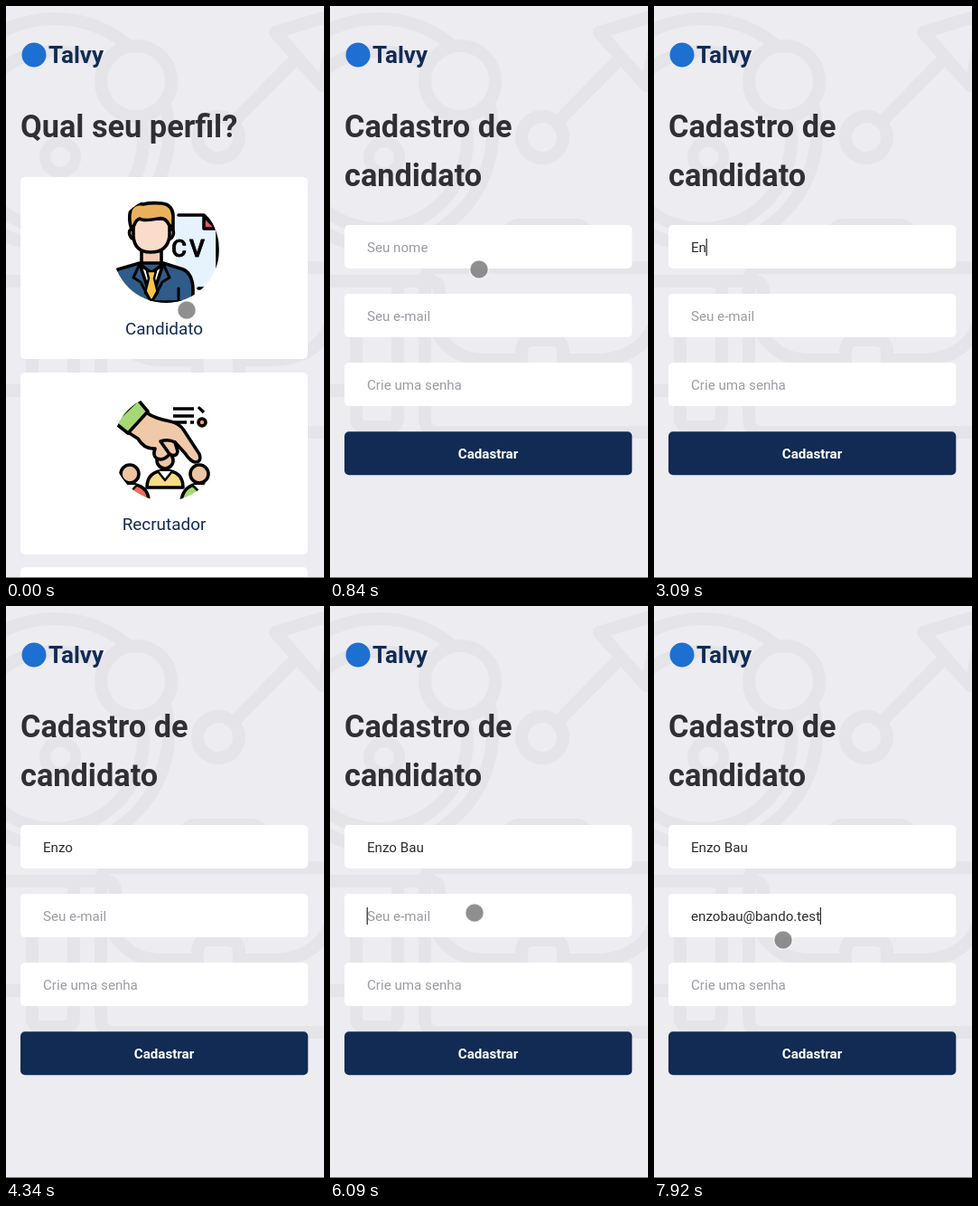
Write an HTML page that moves like this. It is 352 by 632 pixels and loops after 8000 ms.

```html
<!DOCTYPE html>
<html lang="pt">
<head>
<meta charset="utf-8">
<style>
html, body { margin: 0; width: 100%; height: 100%; overflow: hidden; background: #edecf1; }
svg { display: block; font-family: Roboto, sans-serif; }
.title { font-size: 34.3px; font-weight: 700; fill: #303033; }
.label { font-size: 18.9px; fill: #122b54; text-anchor: middle; }
.field { font-size: 15.15px; }
.art { stroke: #000; stroke-width: 3.6; stroke-linejoin: round; stroke-linecap: round; }
</style>
</head>
<body>
<svg width="352" height="632" viewBox="0 0 352 632">
  <defs>
    <clipPath id="clipA"><circle cx="177" cy="269" r="59"/></clipPath>
    <clipPath id="clipB"><circle cx="177" cy="488" r="59"/></clipPath>
  </defs>

  <rect width="352" height="632" fill="#edecf1"/>
  <g fill="none" stroke="#e4e4e9" stroke-width="14" stroke-linejoin="round">
    <circle cx="54" cy="140" r="126"/>
    <circle cx="54" cy="148" r="98"/>
    <circle cx="60" cy="167" r="17" stroke-width="12"/>
    <circle cx="144" cy="83" r="39" fill="#edecf1"/>
    <circle cx="235" cy="145" r="23" fill="#edecf1"/>
    <path d="M252 128L322 57M298 29L368 8L350 88Z"/>
    <path d="M188 289L198 250Q201 242 210 242H272Q281 242 284 250L294 289"/>
    <path d="M360 289H120Q105 289 105 304V456Q105 471 120 471H360"/>
    <path d="M105 325Q120 391 172 391H205M265 391H300Q345 388 360 350"/>
    <path d="M212 412V382Q212 369 225 369H245Q258 369 258 382V412Z"/>
    <path d="M0 304H110Q121 304 121 315V340M0 425H29M29 330V455Q29 465 40 465H65Q75 465 75 455V304"/>
  </g>

  <circle cx="31" cy="54" r="13.5" fill="#1e6fd2"/>
  <text x="47" y="63" font-size="26" font-weight="700" fill="#122b54">Talvy</text>

  <g id="profile">
    <text class="title" x="16" y="145">Qual seu perfil?</text>
    <g id="card">
      <rect x="16" y="189" width="318" height="201" rx="5" fill="#fff"/>
      <g class="art" clip-path="url(#clipA)">
        <path d="M188 231H219L233 245H240V312H212L188 326Z" fill="#e6f3fc" stroke="none"/>
        <path d="M191 231H219L234 246V312H213" fill="none"/>
        <path d="M219 232V246H233Z" fill="#e4576b"/>
        <text x="183" y="277" font-size="26" font-weight="500" letter-spacing="3" stroke-width=".8">CV</text>
        <path d="M150 264V290L160 300L172 290V264Z" fill="#f3c9b5"/>
        <path d="M142 246Q135 246 137 253Q139 259 144 257M180 246Q187 246 185 253Q183 259 178 257" fill="#fbdccb"/>
        <path d="M141 235V254Q142 272 160 272Q179 272 181 254V235Z" fill="#fbdccb"/>
        <path d="M139 247Q135 235 138 225Q142 217 152 219Q160 217 172 218Q184 219 185 231V247L180 241Q176 233 168 235Q152 238 148 235Q144 236 142 242Z" fill="#e9b15c"/>
        <path d="M106 340V312Q108 297 124 291L148 284H174L196 291Q207 296 207 314V327H106Z" fill="#2f5c88"/>
        <path d="M148 285L161 324L174 285L161 295Z" fill="#fff"/>
        <path d="M156 293H166L164 301L168 317L161 326L154 317L158 301Z" fill="#f4c64c" stroke-width="2.5"/>
        <path d="M148 285L141 300L149 305L160 326M174 285L181 300L173 305L162 326M130 312V327M191 312V327" fill="none" stroke-width="3"/>
      </g>
      <text class="label" x="175" y="363">Candidato</text>
    </g>
    <rect x="16" y="405" width="318" height="201" rx="5" fill="#fff"/>
    <g class="art" clip-path="url(#clipB)">
      <path d="M185 445H208M185 453H208M185 460H200M204 460H208M213 443L219 449" fill="none" stroke-linecap="butt"/>
      <circle cx="217" cy="460" r="4" fill="#f0a844"/>
      <path d="M156 532Q156 514 176 513Q196 514 196 532Z" fill="#f9dc83"/>
      <path d="M168 514L176 524L184 514" fill="#fff" stroke-width="2.5"/>
      <circle cx="176" cy="502" r="9" fill="#efc4a3"/>
      <path d="M116 555Q118 529 137 528Q157 529 158 546Z" fill="#e76f5c"/>
      <path d="M194 546Q197 529 214 528Q233 529 236 555Z" fill="#a6d875"/>
      <path d="M130 529L138 537L145 529M206 529L214 537L222 529" fill="#fff" stroke-width="2.5"/>
      <circle cx="137" cy="517" r="10" fill="#efc4a3"/>
      <circle cx="214" cy="517" r="10" fill="#efc4a3"/>
      <path d="M135 471L155 449Q165 456 182 459Q192 461 197 469L214 495Q217 504 209 504Q204 503 198 494L187 482L190 492Q189 499 181 495Q175 503 167 500Q162 497 165 489Q153 490 146 478Z" fill="#f0c9a9"/>
      <path d="M181 495L171 481Q180 478 187 482" fill="none"/>
      <path d="M120 460L146 435L157 448L135 472Z" fill="#a6d875"/>
    </g>
    <text class="label" x="175" y="579">Recrutador</text>
    <rect x="16" y="620" width="318" height="30" rx="5" fill="#fff"/>
  </g>

  <g id="form">
    <text class="title" x="16" y="145">Cadastro de</text>
    <text class="title" x="16" y="199">candidato</text>
    <g fill="#fff">
      <rect x="16" y="242" width="318.3" height="48" rx="5"/>
      <rect x="16" y="318" width="318.3" height="48" rx="5"/>
      <rect x="16" y="394" width="318.3" height="48" rx="5"/>
    </g>
    <rect x="16" y="470.2" width="318.3" height="48" rx="5" fill="#122b54"/>
    <text class="field" id="name" x="41" y="272" xml:space="preserve"></text>
    <text class="field" id="mail" x="41" y="348"></text>
    <text class="field" x="41" y="424" fill="#9b9ba3">Crie uma senha</text>
    <text class="field" x="175" y="500" font-weight="700" fill="#fff" text-anchor="middle">Cadastrar</text>
    <rect id="caret" width="1.2" height="19" fill="#222"/>
  </g>

  <circle id="pointer" r="10.3" fill="#808080" fill-opacity=".88" stroke="#fff" stroke-opacity=".75" stroke-width="1.4"/>
  <rect y="631" width="352" height="1" fill="#77777b"/>
</svg>
<script>
const LOOP = 8000, PAGE = 840, FOCUS_NAME = 2500, FOCUS_MAIL = 6000;
const $ = id => document.getElementById(id);
const range = (n, start, step) => Array.from({ length: n }, (_, i) => start + i * step);

const fields = {
  name: { el: $('name'), text: 'Enzo Bau', hint: 'Seu nome',
    keys: [2750, 2920, 3340, 3590, 4500, 4670, 4840, 5000] },
  mail: { el: $('mail'), text: 'enzobau@bando.test', hint: 'Seu e-mail',
    keys: [...range(12, 6420, 72), ...range(6, 7500, 66)] }
};

// pointer path: time, x, y
const path = [[0, 200, 336], [150, 200, 336], [500, 165, 291], [1660, 165, 291],
  [2330, 150, 268], [5150, 150, 268], [5850, 160, 339], [7600, 160, 339], [7920, 143, 369]];
const hidden = [[2740, 5160], [6400, 7600]];

const clamp = v => Math.max(0, Math.min(1, v));
const smooth = v => { v = clamp(v); return v * v * (3 - 2 * v); };
const within = (t, [a, b]) => t >= a && t < b;

function pointerAt(t) {
  let i = 0;
  while (i < path.length - 2 && t >= path[i + 1][0]) i++;
  const [t0, x0, y0] = path[i], [t1, x1, y1] = path[i + 1];
  const k = smooth((t - t0) / (t1 - t0));
  return [x0 + (x1 - x0) * k, y0 + (y1 - y0) * k];
}

function fill({ el, text, hint, keys }, t) {
  const typed = text.slice(0, keys.filter(k => k <= t).length);
  el.textContent = typed || hint;
  el.setAttribute('fill', typed ? '#2b2b2f' : '#9b9ba3');
  return typed ? el.getComputedTextLength() : 0;
}

function draw(t) {
  const onForm = t >= PAGE;
  $('profile').style.display = onForm ? 'none' : '';
  $('form').style.display = onForm ? '' : 'none';
  $('card').setAttribute('transform', `translate(0 ${-5 * smooth((t - 160) / 300)})`);

  if (onForm) {
    const widths = { name: fill(fields.name, t), mail: fill(fields.mail, t) };
    const active = t >= FOCUS_MAIL ? 'mail' : 'name';
    const focus = active === 'mail' ? FOCUS_MAIL : FOCUS_NAME;
    const last = Math.max(focus, ...fields[active].keys.filter(k => k <= t));
    const on = t >= focus && (t - last) % 1060 < 530;
    const caret = $('caret');
    caret.setAttribute('x', 40.6 + widths[active]);
    caret.setAttribute('y', active === 'mail' ? 333 : 257);
    caret.style.display = on ? '' : 'none';
  }

  const [x, y] = pointerAt(t), pointer = $('pointer');
  pointer.setAttribute('cx', x);
  pointer.setAttribute('cy', y);
  pointer.style.opacity = hidden.some(h => within(t, h)) ? 0 : within(t, [670, PAGE]) ? 0.5 : 1;
}

function tick() {
  draw(performance.now() % LOOP);
  requestAnimationFrame(tick);
}
tick();
</script>
</body>
</html>
```
